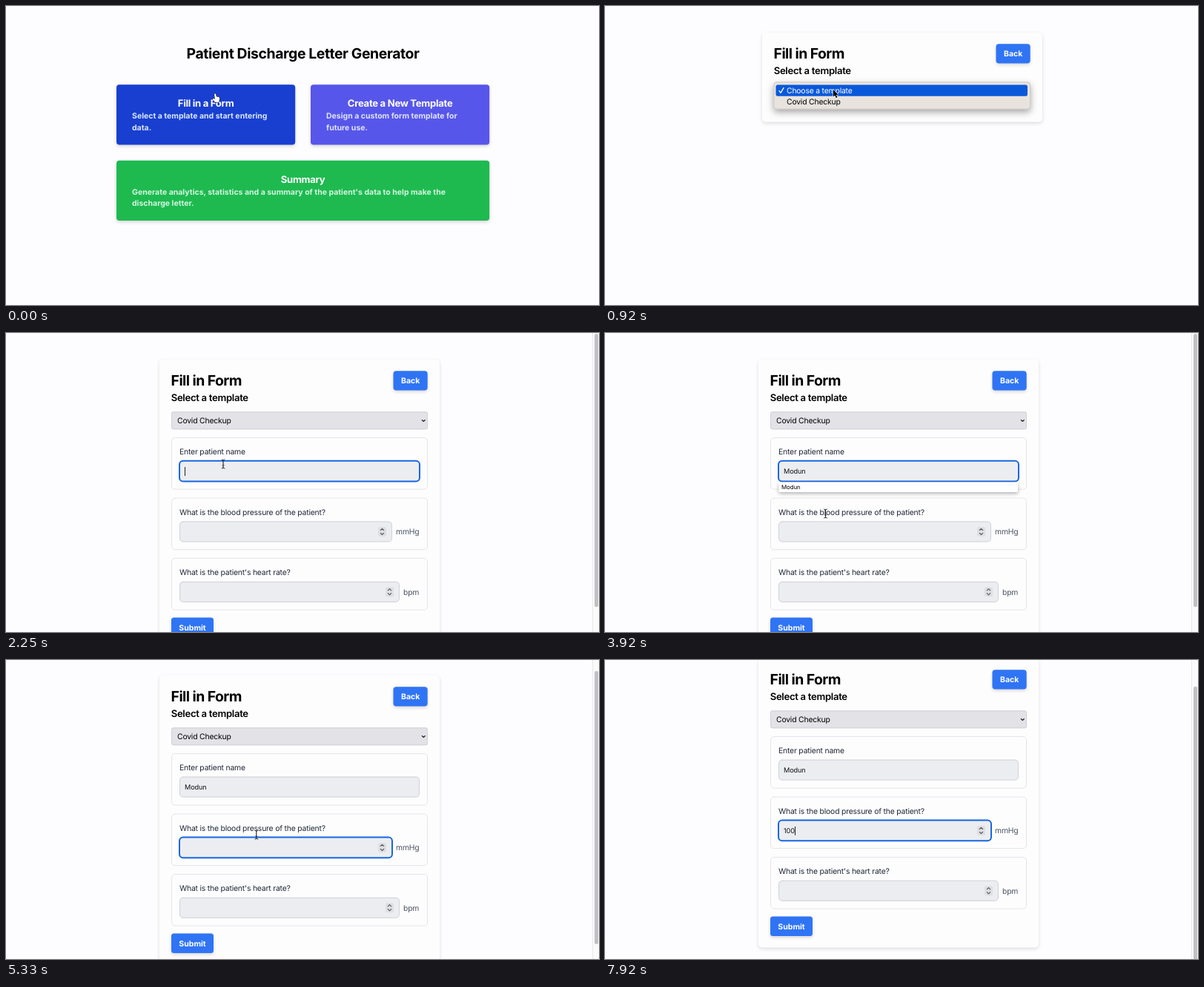
Write an HTML page with a canvas that moves like this. It is 800x404 px and loops after 8000 ms.

```html
<!DOCTYPE html>
<html lang="en">
<head>
<meta charset="utf-8">
<title>Patient Discharge Letter Generator</title>
<style>
  html, body { margin: 0; width: 100%; height: 100%; overflow: hidden; background: #fdfcfe; }
  canvas { display: block; width: 100%; height: 100%; }
</style>
</head>
<body>
<canvas id="stage"></canvas>
<script>
const W = 800, H = 404, LOOP = 8000, FPS = 12;
const canvas = document.getElementById('stage');
const ctx = canvas.getContext('2d');
const ratio = window.devicePixelRatio || 1;
canvas.width = W * ratio;
canvas.height = H * ratio;

const PATIENT = 'Modun';
const BLUE = '#2f74f4', RING = '#1767e2', INK = '#1f2937';

// Moments at which the state changes, in ms
const T = {
  form: 330, open: 750, pick: 1410, focusName: 2070,
  typeName: [2740, 2830, 2990, 3080, 3240], mouseBack: 3580,
  focusPressure: 4505, scroll: [5010, 5750],
  typePressure: [7575, 7740, 7910]
};
const BLINK = 560;

// Pointer path: time, x, y
const PATH = [
  [0, 282, 118], [330, 282, 118], [670, 308, 113], [1000, 308, 113],
  [1330, 304, 128], [1500, 304, 128], [1920, 293, 177], [3580, 293, 177],
  [3900, 297.5, 244], [4170, 297.5, 244], [4420, 326, 266], [4560, 326, 266],
  [4830, 340, 240], [5083, 340, 240], [5750, 333, 228], [5830, 333.5, 228.5]
];

const STYLE = {
  title: ['700 19.4px', -0.4],
  formTitle: ['700 19.4px', -0.56],
  heading: ['600 13.1px', -0.3],
  cardTitle: ['700 13.1px', -0.29],
  strong: ['700 10.5px', 0],
  body: ['400 10.4px', -0.2],
  input: ['400 9.2px', -0.13],
  hint: ['400 7.9px', -0.07]
};

const smooth = p => { p = Math.min(1, Math.max(0, p)); return p * p * (3 - 2 * p); };
const typed = (text, times, t) => text.slice(0, times.filter(k => t >= k).length);

function text(str, x, y, style, color = '#000', align = 'left') {
  const [font, spacing] = STYLE[style];
  ctx.font = font + ' Inter, "Liberation Sans", sans-serif';
  ctx.letterSpacing = spacing + 'px';
  ctx.textRendering = 'geometricPrecision';
  ctx.textAlign = align;
  ctx.fillStyle = color;
  ctx.fillText(str, x, y);
  return ctx.measureText(str).width;
}

function shadow(color, blur, dy) {
  ctx.shadowColor = color;
  ctx.shadowBlur = blur * ratio;
  ctx.shadowOffsetY = dy * ratio;
}

function box(x, y, w, h, r, fill, stroke, width = 1) {
  ctx.beginPath();
  ctx.roundRect(x, y, w, h, r);
  if (fill) { ctx.fillStyle = fill; ctx.fill(); }
  if (stroke) {
    ctx.beginPath();
    ctx.roundRect(x + width / 2, y + width / 2, w - width, h - width, r - width / 2);
    ctx.strokeStyle = stroke;
    ctx.lineWidth = width;
    ctx.stroke();
  }
}

function raised(x, y, w, h, r, fill) {
  ctx.save();
  shadow('rgba(0,0,0,.16)', 4, 2);
  box(x, y, w, h, r, fill);
  ctx.restore();
}

function line(points, color, width) {
  ctx.beginPath();
  points.forEach(([x, y]) => ctx.lineTo(x, y));
  ctx.strokeStyle = color;
  ctx.lineWidth = width;
  ctx.lineCap = ctx.lineJoin = 'round';
  ctx.stroke();
}

// Open arrow head; dir 1 points down, -1 points up
const chevron = (x, y, r, dir, color) =>
  line([[x - r, y - dir * r / 2], [x, y + dir * r / 2], [x + r, y - dir * r / 2]], color, 1.1);

function homeCard(x, y, w, color, title, tint, lines) {
  raised(x, y, w, 81.3, 4, color);
  text(title, x + w / 2, y + 30, 'cardTitle', '#fff', 'center');
  lines.forEach((s, i) => text(s, x + 21, y + 45.8 + i * 15.8, 'strong', tint));
}

function home() {
  text('Patient Discharge Letter Generator', 400.5, 70.8, 'title', '#000', 'center');
  homeCard(149, 106.3, 241.2, '#193fd0', 'Fill in a Form', '#dbe8fd',
    ['Select a template and start entering', 'data.']);
  homeCard(411, 106.3, 241.2, '#5756ea', 'Create a New Template', '#dfe4fe',
    ['Design a custom form template for', 'future use.']);
  homeCard(149, 208.7, 503.2, '#1eba50', 'Summary', '#d3f6df',
    ["Generate analytics, statistics and a summary of the patient's data to help make the",
     'discharge letter.']);
}

function field(y, width, value, focusTime, keys, t, endTime = Infinity) {
  const focused = t >= focusTime && t < endTime;
  box(234, y, width, 28, 5, '#ecedf1', '#d0d3da');
  if (focused) box(233, y - 0.8, width + 2, 29.6, 6, '#ecedf1', RING, 2);
  const shown = typed(value, keys, t);
  const w = shown ? text(shown, 241, y + 17.8, 'input', '#111') : 0;
  const since = t - Math.max(focusTime, ...keys.filter(k => k <= t));
  if (focused && Math.floor(since / BLINK) % 2 === 0) {
    ctx.fillStyle = '#222';
    ctx.fillRect(241 + Math.round(w), y + 8.5, 1, 12);
  }
}

function group(y, label, unit, width) {
  box(223, y, 346, 70.6, 5, null, '#e4e5ea');
  text(label, 234, y + 23, 'body', INK);
  if (unit) text(unit, 234 + width + 5, y + 49.8, 'body', '#4b5563');
}

function spinner(x, y) {
  box(x - 5.5, y - 6.5, 11, 13, 2.5, '#dedfe3');
  chevron(x, y - 3, 2.2, -1, '#555');
  chevron(x, y + 3, 2.2, 1, '#555');
}

function select(label) {
  box(223, 106.3, 346, 24, 3, '#e3e2e7', '#d0d0d7');
  text(label, 231, 122, 'body');
  chevron(563.3, 118.5, 2, 1, '#222');
}

function popup() {
  ctx.save();
  shadow('rgba(0,0,0,.35)', 10, 4);
  box(222.5, 102.5, 346.5, 37, 4, '#e8e3de');
  ctx.restore();
  box(222.5, 102.5, 346.5, 37, 4, null, '#c9c5c1', 0.8);
  box(225.5, 106.4, 339.5, 15.3, 2.5, '#0958d9');
  line([[230, 114.6], [232, 117.3], [236, 110.6]], '#fff', 1.3);
  text('Choose a template', 240, 118, 'body', '#fff');
  text('Covid Checkup', 240, 133, 'body');
}

function questions(t) {
  group(141, 'Enter patient name');
  field(172.6, 324, PATIENT, T.focusName, T.typeName, t, T.focusPressure);

  group(222.5, 'What is the blood pressure of the patient?', 'mmHg', 287);
  field(254.4, 287, '100', T.focusPressure, T.typePressure, t);
  spinner(507.5, 268.4);

  group(304, "What is the patient's heart rate?", 'bpm', 297);
  field(335.8, 297, '', Infinity, [], t);
  spinner(517.5, 349.8);

  raised(223, 384.6, 57, 26.3, 3.5, BLUE);
  text('Submit', 251.5, 401.8, 'strong', '#fff', 'center');

  if (t >= T.typeName[0] && t < T.focusPressure) {
    ctx.save();
    shadow('rgba(0,0,0,.3)', 5, 2);
    box(234.5, 201.5, 322.5, 13.5, 1.5, '#fff');
    ctx.restore();
    text(PATIENT, 238, 211.2, 'hint');
  }
}

function form(t, scroll) {
  const chosen = t >= T.pick;
  ctx.save();
  ctx.translate(chosen ? 0 : 5, -scroll);
  ctx.save();
  shadow('rgba(0,0,0,.13)', 5, 2);
  box(207, 35.5, 378, chosen ? 391 : 121.2, 5, '#fefdfe');
  ctx.restore();

  text('Fill in Form', 222.6, 70.8, 'formTitle');
  raised(522.5, 51.3, 46.2, 26.2, 4, BLUE);
  text('Back', 545.6, 68.2, 'strong', '#fff', 'center');
  text('Select a template', 222.7, 91.5, 'heading');

  select(chosen ? 'Covid Checkup' : 'Choose a template');
  if (chosen) questions(t);
  else if (t >= T.open) popup();
  ctx.restore();

  if (chosen) scrollbar(scroll);
}

function scrollbar(scroll) {
  ctx.fillStyle = '#fafafa';
  ctx.fillRect(791, 0, 9, H);
  ctx.fillStyle = '#e9e9eb';
  ctx.fillRect(791, 0, 1, H);
  const size = H * H / (H + 38);
  box(794, scroll * size / H + 1, 5, size, 2.5, '#c1c1c3');
}

function pointerAt(t) {
  const i = PATH.findIndex(k => k[0] > t);
  if (i < 0) return PATH[PATH.length - 1].slice(1);
  const [t0, x0, y0] = PATH[i - 1], [t1, x1, y1] = PATH[i];
  const p = smooth((t - t0) / (t1 - t0));
  return [x0 + (x1 - x0) * p, y0 + (y1 - y0) * p];
}

const SHAPES = {
  hand: 'M-1 1Q0-.6 1 1L2 4.4L4.6 4.8L6.2 6Q6.4 9 5 12H0L-3 8.2Q-3.4 6.6-1.6 7L-.2 8.2Z',
  arrow: 'M0 0V9.6L2.2 7.6L3.7 11.2L5.3 10.5L3.8 7H6.8Z',
};

function pointer(t) {
  const typing = t >= T.typeName[0] && t < T.mouseBack || t >= T.typePressure[0];
  if (typing) return;
  const [x, y] = pointerAt(t);
  ctx.save();
  ctx.translate(x, y);
  if (t >= T.pick && y > 150) {
    line([[-2, -6], [0, -5], [2, -6]], '#333', 1);
    line([[0, -5], [0, 5]], '#222', 1.1);
    line([[-2, 6], [0, 5], [2, 6]], '#333', 1);
    line([[-1.2, 1.8], [1.2, 1.8]], '#333', 0.8);
  } else {
    const hand = t < T.form;
    const shape = new Path2D(hand ? SHAPES.hand : SHAPES.arrow);
    ctx.lineJoin = 'round';
    ctx.lineWidth = 1;
    ctx.strokeStyle = hand ? '#000' : '#fff';
    ctx.fillStyle = hand ? '#fff' : '#000';
    ctx.stroke(shape);
    ctx.fill(shape);
  }
  ctx.restore();
}

function draw(t) {
  ctx.setTransform(ratio, 0, 0, ratio, 0, 0);
  ctx.fillStyle = '#fdfcfe';
  ctx.fillRect(0, 0, W, H);
  const [from, to] = T.scroll;
  if (t < T.form) home();
  else form(t, Math.round(38 * smooth((t - from) / (to - from))));
  pointer(t);
}

const start = performance.now();
function tick() {
  const elapsed = (performance.now() - start) % LOOP;
  draw(Math.floor((elapsed + 5) * FPS / 1000) * 1000 / FPS % LOOP);
  requestAnimationFrame(tick);
}
tick();
</script>
</body>
</html>
```
